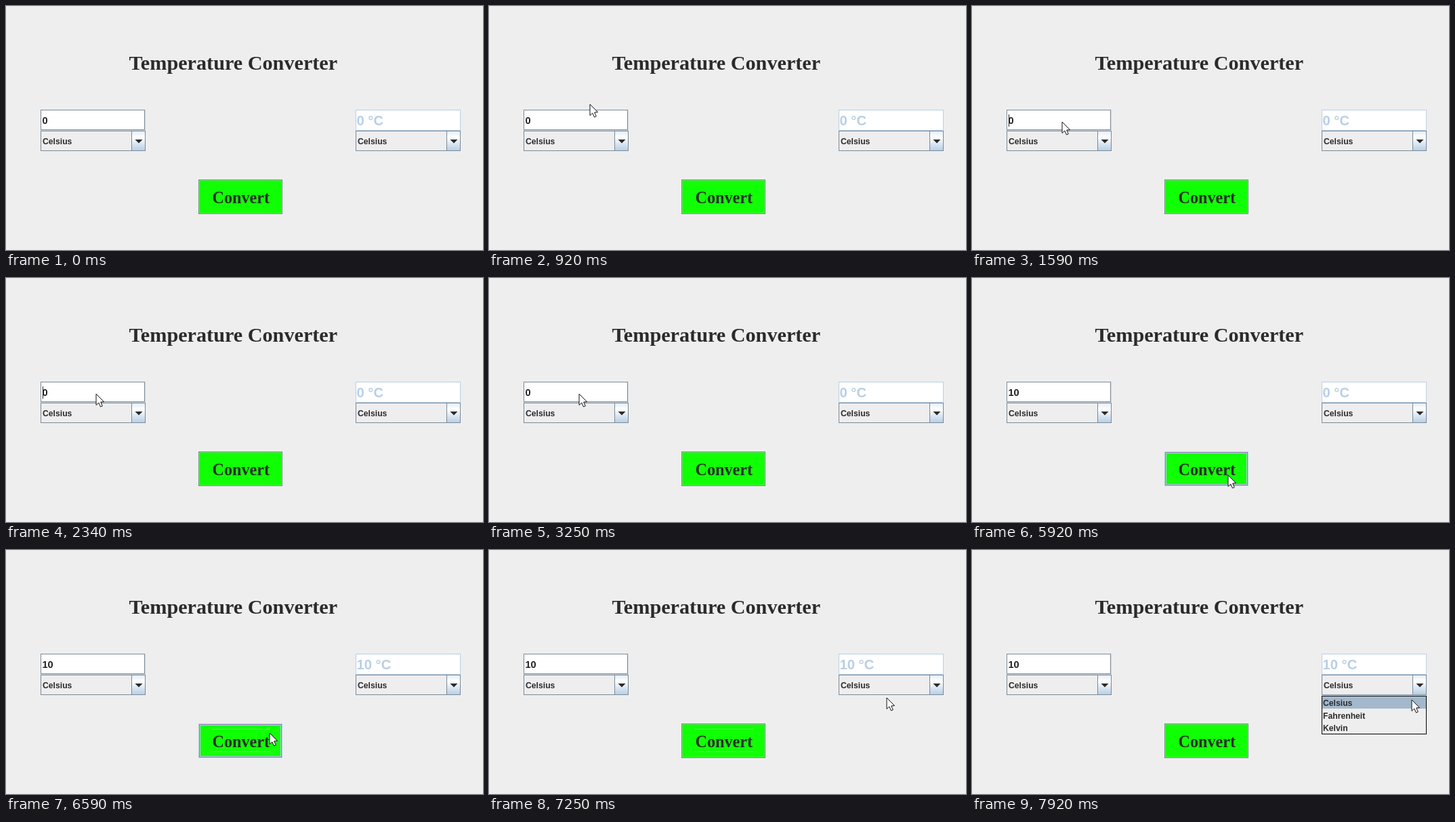
Animation, 704 px wide and 360 px high, one loop 8000 ms. Source, as an HTML page with a canvas:

```html
<!DOCTYPE html>
<html lang="en">
<head>
<meta charset="utf-8">
<title>Temperature Converter</title>
<style>
  html, body { margin: 0; width: 100%; height: 100%; overflow: hidden; background: #eee; }
  canvas { display: block; width: 704px; height: 360px; }
</style>
</head>
<body>
<canvas id="stage" width="704" height="360"></canvas>
<script>
const ctx = document.getElementById('stage').getContext('2d');
const LOOP = 8000, STEP = 8000 / 96;
const SANS = '"Liberation Sans", Arial, sans-serif';
const SERIF = '"Liberation Serif", "Times New Roman", serif';
const PANEL = '#eee', INK = '#2b2b2b', EDGE = '#7a8a99', PALE = '#b8cfe5', SELECTED = '#a3b8cc';
const GREEN = '#11ff05';

// Moments of user actions, in ms
const FOCUS_FIELD = 1300, TYPE_ONE = 5300, CONVERT = 6230, OPEN_LIST = 7650;

// Pointer path: time, x, y
const path = [
  [240, 37, 14], [840, 149, 145], [920, 149, 145], [1250, 133, 171], [3250, 133, 171],
  [3333, 272, 331], [5250, 272, 331], [5500, 285, 342], [5833, 375, 297], [6100, 389, 270],
  [6740, 389, 270], [7500, 654, 200], [7583, 671, 200], [7670, 668, 201], [7910, 649, 221]
];

function pointerAt(t) {
  if (t < path[0][0]) return null;
  const next = path.findIndex(key => key[0] > t);
  if (next < 0) return path[path.length - 1].slice(1);
  const [t0, x0, y0] = path[next - 1], [t1, x1, y1] = path[next];
  const p = (t - t0) / (t1 - t0), ease = p * p * (3 - 2 * p);
  return [Math.round(x0 + (x1 - x0) * ease), Math.round(y0 + (y1 - y0) * ease)];
}

function fill(x, y, w, h, color) {
  ctx.fillStyle = color;
  ctx.fillRect(x, y, w, h);
}

function frame(x, y, w, h, color) {
  ctx.strokeStyle = color;
  ctx.lineWidth = 1;
  ctx.strokeRect(x + .5, y + .5, w - 1, h - 1);
}

function text(str, x, y, size, color = INK, family = SANS) {
  ctx.font = `bold ${size}px ${family}`;
  ctx.fillStyle = color;
  ctx.fillText(str, x, y);
}

function polygon(points, color) {
  ctx.beginPath();
  points.forEach(([x, y]) => ctx.lineTo(x, y));
  ctx.closePath();
  ctx.fillStyle = color;
  ctx.fill();
}

function inputField(value, t) {
  fill(51, 153, 155, 31, '#fff');
  frame(51, 153, 155, 31, '#d5dde5');
  frame(51, 153, 154, 30, EDGE);
  text(value, 53.5, 174, 14.6, '#222');
  if (t < FOCUS_FIELD || t >= CONVERT) return;
  const typed = t >= TYPE_ONE;
  const sinceReset = t - (typed ? TYPE_ONE : FOCUS_FIELD);
  if (sinceReset % 1000 < 500) fill(typed ? 62 : 54, 160, 1, 18, '#222');
}

function resultField(value) {
  fill(516, 153, 155, 31, '#fff');
  frame(516, 153, 155, 31, PALE);
  text(value + ' °C', 517.5, 176, 20.2, PALE);
}

function comboBox(x) {
  fill(x, 184, 155, 30, PANEL);
  const shade = ctx.createLinearGradient(0, 185, 0, 213);
  shade.addColorStop(0, '#e4edf6');
  shade.addColorStop(.3, '#fff');
  shade.addColorStop(1, PALE);
  fill(x + 135, 185, 19, 28, shade);
  frame(x, 184, 155, 30, EDGE);
  fill(x + 134, 185, 1, 28, EDGE);
  polygon([[x + 139.5, 197], [x + 150.5, 197], [x + 145, 202.5]], INK);
  text('Celsius', x + 3, 203.5, 12.2);
}

function convertButton(hover, focused) {
  fill(284, 256, 124, 51, GREEN);
  if (hover) {
    [PALE, EDGE, PALE].forEach((color, i) => frame(284 + i, 256 + i, 124 - 2 * i, 51 - 2 * i, color));
  } else {
    frame(284, 256, 124, 51, '#5c9c6c');
    frame(285, 257, 122, 49, '#5cf558');
  }
  if (focused) {
    fill(304, 264, 86, 1, '#7fe08a');
    fill(304, 297, 86, 1, '#7fe08a');
  }
  text('Convert', 304.5, 291, 24.2, INK, SERIF);
}

function unitList() {
  fill(516, 215, 155, 57, PANEL);
  fill(517, 216, 153, 18, SELECTED);
  frame(516, 215, 155, 57, '#000');
  ['Celsius', 'Fahrenheit', 'Kelvin'].forEach((unit, i) => text(unit, 518, 230 + i * 18.5, 12.2));
}

function pointer([x, y]) {
  const arrow = [[0, 0], [0, 16.5], [3.8, 13], [6.5, 19], [9.3, 17.8], [6.7, 12], [11.6, 11.7]];
  ctx.save();
  ctx.translate(x, y);
  polygon(arrow, '#fff');
  ctx.strokeStyle = '#111';
  ctx.lineWidth = 1;
  ctx.stroke();
  ctx.restore();
}

function draw(t) {
  const tip = pointerAt(t);
  const hover = tip && tip[0] >= 284 && tip[0] < 408 && tip[1] >= 256 && tip[1] < 307;
  fill(0, 0, 704, 360, PANEL);
  text('Temperature Converter', 181.5, 94, 30.2, INK, SERIF);
  inputField(t < TYPE_ONE ? '0' : '10', t);
  resultField(t < CONVERT ? '0' : '10');
  comboBox(51);
  comboBox(516);
  convertButton(hover, t >= CONVERT && t < OPEN_LIST);
  if (t >= OPEN_LIST) unitList();
  if (tip) pointer(tip);
}

const start = performance.now();
function tick() {
  const t = (performance.now() - start) % LOOP;
  draw(Math.floor(t / STEP) * STEP);
  requestAnimationFrame(tick);
}
tick();
</script>
</body>
</html>
```
